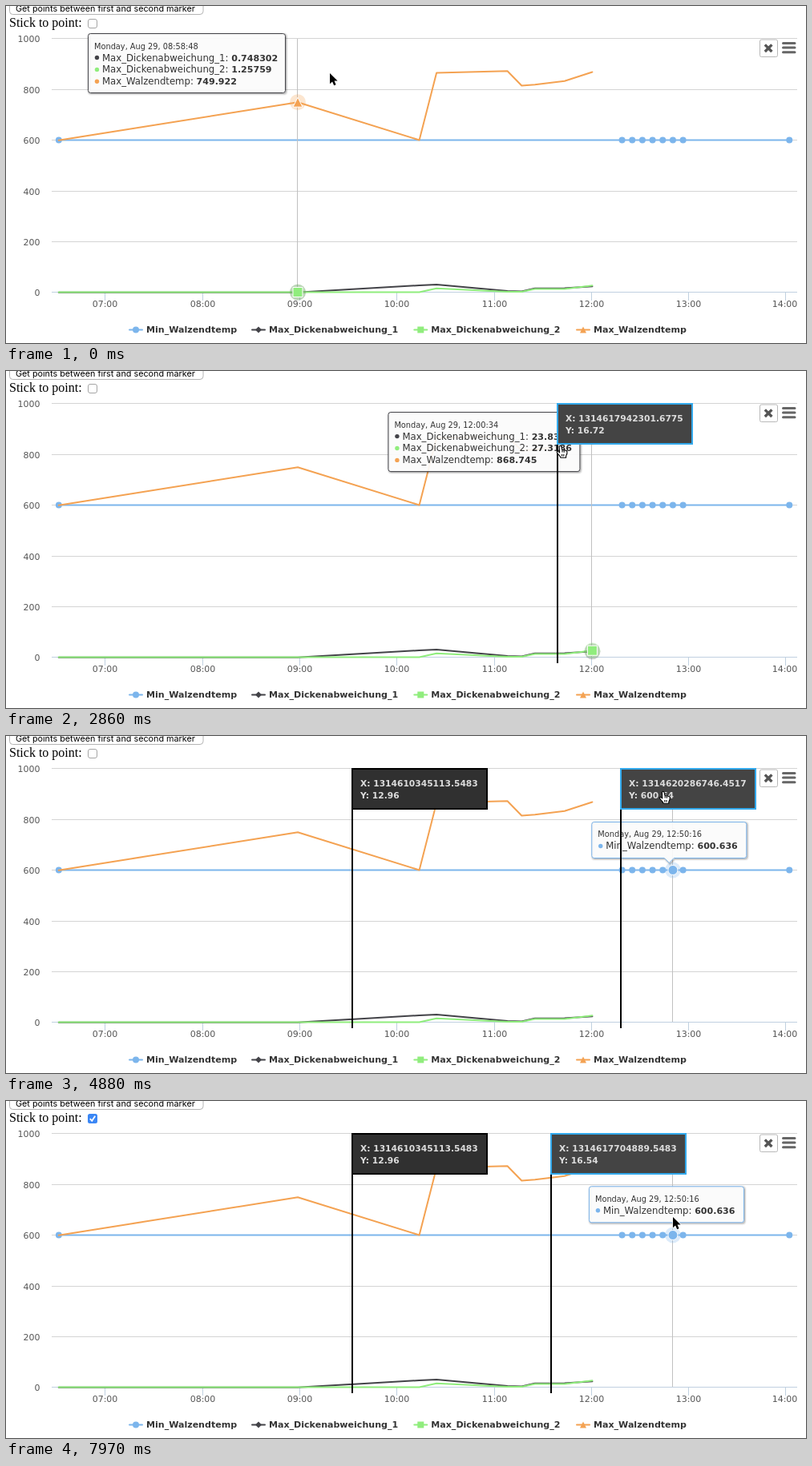
An HTML page for the animation above (8000 ms loop, 998 px wide and 421 px high).

```html
<!DOCTYPE html>
<html lang="en">
<head>
<meta charset="utf-8">
<title>Chart markers</title>
<style>
html, body { margin: 0; width: 100%; height: 100%; overflow: hidden; background: #fff; }
svg { display: block; width: 998px; height: 421px; }
text { font-family: "DejaVu Sans", sans-serif; font-size: 11.7px; fill: #333; white-space: pre; }
.axis { font-size: 11px; fill: #555; }
.head { font-size: 9.8px; }
.bold { font-size: 11.05px; font-weight: bold; }
.tag { font-size: 10.7px; font-weight: bold; fill: #ddd; }
.btn { font: 10.8px Inter, sans-serif; fill: #000; }
.stick { font: 16px "Liberation Serif", serif; fill: #000; }
</style>
</head>
<body>
<svg viewBox="0 0 998 421">
  <g id="base"></g>
  <g id="live"></g>
</svg>
<script>
const LOOP = 8000, STEP = 8;
const HOUR_W = 121.3, MIN = 600.636;
const SERIES = [
  { name: 'Min_Walzendtemp', color: '#7cb5ec', shape: 'circle', legend: 154 },
  { name: 'Max_Dickenabweichung_1', color: '#434348', shape: 'diamond', legend: 307 },
  { name: 'Max_Dickenabweichung_2', color: '#90ed7d', shape: 'square', legend: 509.3 },
  { name: 'Max_Walzendtemp', color: '#f4a252', shape: 'triangle', legend: 712 }
];
const [BLUE, DARK] = SERIES.map(e => e.color);

const xOf = hour => 123.8 + (hour - 7) * HOUR_W;
const yOf = v => 357.9 - v * 0.317;
const clamp = (v, lo, hi) => Math.max(lo, Math.min(hi, v));
const pad = n => String(n).padStart(2, '0');

function clock(hour) {
  const s = Math.round(hour * 3600);
  return [s / 3600, s / 60 % 60, s % 60].map(n => pad(Math.floor(n))).join(':');
}

// [second of the day, thickness 1, thickness 2, temperature]
const ROLLS = [
  [23480, 0.61204, 0.8125, 600.121],
  [32328, 0.748302, 1.25759, 749.922],
  [36827, 27.9792, 1.2571, 600.715],
  [37467, 31.0042, 16.1258, 866.067],
  [40091, 5.57699, 2.3787, 872.496],
  [40619, 4.31072, 2.6114, 815.214],
  [41108, 16.0901, 14.0262, 818.903],
  [42206, 16.9203, 13.6107, 833.117],
  [43234, 23.8312, 27.3186, 868.745]
].map(([s, ...values]) => ({ hour: s / 3600, values }));

// Seven readings about six minutes apart, then a late one
const minHours = Array.from({ length: 7 }, (_, i) => 46216 / 3600 + (i - 5) * 0.1045).concat(14.036);

const points = ROLLS.map((r, i) => ({
  hour: r.hour,
  rows: (i ? [] : [[0, MIN]]).concat(r.values.map((v, k) => [k + 1, v]))
})).concat(minHours.map(hour => ({ hour, rows: [[0, MIN]] })));

for (const p of points) {
  p.x = xOf(p.hour);
  p.single = p.rows.length === 1;
  const longest = Math.max(...p.rows.map(r => String(r[1]).length));
  p.w = p.single ? 193 : 190 + longest * 7;
  p.h = 30.5 + 14.5 * p.rows.length;
  p.left = p.single ? p.x - p.w / 2 : p.x - 15.5 - p.w;
  if (p.left < 57) p.left = p.x + 15.5;
}

// Pointer stops: [time, x, y]
const STOPS = [[40, 404, 84], [210, 419, 88], [970, 419, 88], [1400, 470, 88], [1738, 581, 89],
  [1890, 666, 90], [2300, 735, 93], [2650, 735, 93], [2860, 692, 93], [3480, 442, 114], [3690, 481, 112],
  [4150, 766, 72], [4420, 766, 72], [4650, 834, 69], [4790, 834, 69], [4870, 822, 69], [5300, 735, 69],
  [5450, 735, 69], [5700, 545, 40], [5920, 180, 20], [6130, 86, 23], [7120, 86, 23], [7250, 150, 50],
  [7580, 832, 145]];

// Marker stops: [time, ms after EPOCH]
const EPOCH = 1314610000000, SEVEN = -8800000;
const FIRST = { born: 620, grab: 970, free: 4420,
  stops: [[1000, -15168.7734], [1930, 3550177.2903], [2300, 9185161.2581], [2600, 9185161.2581],
    [2905, 7942301.6775], [3530, 345113.5483]] };
const SECOND = { born: 4150, grab: 4420, free: LOOP,
  stops: [[4930, 10286746.4517], [5300, 7704889.5483]] };

// Walks linearly from stop to stop, resting for a while before each next one
function travel(stops, t, k = 1, rest = 0) {
  const i = stops.findIndex(s => t < s[0]);
  if (i === 0) return stops[0][k];
  if (i < 0) return stops[stops.length - 1][k];
  const a = stops[i - 1], b = stops[i];
  const u = Math.min(1, (t - a[0]) / (b[0] - a[0] - rest));
  return a[k] * (1 - u) + b[k] * u;
}
const pointer = t => ({ x: travel(STOPS, t, 1), y: travel(STOPS, t, 2) });
const markerMs = (m, t) => travel(m.stops, t, 1, 45);
const markerHour = (m, t) => 7 + (markerMs(m, t) - SEVEN) / 3600000;

// The tooltip follows the nearest point, covering a third of the way every 32 ms
const LAG = 120;
const glide = Math.pow(2 / 3, STEP / 32);
const states = [];
(function simulate() {
  let s = { p: points[1], x: points[1].left, y: 34.5, ty: 34.5, idle: 0 };
  for (let t = 0; t <= LOOP; t += STEP) {
    const c = pointer(t - LAG);
    s = { ...s };
    if (c.y < 41) {
      s.idle += STEP;
    } else {
      const p = points.reduce((a, b) => Math.abs(b.x - c.x) < Math.abs(a.x - c.x) ? b : a);
      if (p !== s.p) s.ty = p.single ? 107.5 : Math.max(32, c.y - 41) + 0.5;
      if (s.idle > 700) Object.assign(s, { x: p.left, y: s.ty });
      s.p = p;
      s.idle = 0;
    }
    s.x = s.p.left + (s.x - s.p.left) * glide;
    s.y = s.ty + (s.y - s.ty) * glide;
    states.push(s);
  }
})();

const rect = (x, y, w, h, attrs) => `<rect x="${x}" y="${y}" width="${w}" height="${h}" ${attrs}/>`;
const path = (d, attrs) => `<path d="${d}" ${attrs}/>`;
const text = (x, y, s, attrs = '') => `<text x="${x}" y="${y}" ${attrs}>${s}</text>`;
const lineTo = pts => 'M' + pts.map(p => p[0].toFixed(1) + ' ' + p[1].toFixed(1)).join('L');

function symbol(shape, x, y, r, attrs) {
  if (shape === 'circle') return `<circle cx="${x}" cy="${y}" r="${r}" ${attrs}/>`;
  const d = {
    diamond: `M${x} ${y - r}l${r} ${r}l${-r} ${r}l${-r} ${-r}z`,
    square: `M${x - r} ${y - r}h${2 * r}v${2 * r}h${-2 * r}z`,
    triangle: `M${x} ${y - r}l${r} ${2 * r}h${-2 * r}z`
  };
  return path(d[shape], attrs);
}

function drawBase() {
  let s = rect(4.5, -10.5, 241.5, 21, 'rx="4" fill="#fff" stroke="#b4b4b4"');
  s += text(12, 7, 'Get points between first and second marker', 'class="btn"');
  s += text(4, 26, 'Stick to point:', 'class="stick"');
  for (let v = 0; v <= 1000; v += 200) {
    const y = Math.round(yOf(v) - 0.5) + 0.5;
    s += path(`M57 ${y}H987`, 'stroke="#d4d4d4"');
    s += text(42.5, y + 4.5, v, 'class="axis" text-anchor="end"');
  }
  s += path('M57 357.5H987', 'stroke="#c0d0e0"');
  for (let h = 7; h <= 14; h++) {
    const x = Math.floor(xOf(h)) + 0.5;
    s += path(`M${x} 358v10`, 'stroke="#c0d0e0"');
    s += text(Math.min(x, 971.5), 376, pad(h) + ':00', 'class="axis" text-anchor="middle"');
  }
  const stroke = c => `fill="none" stroke="${c}" stroke-width="2" stroke-linejoin="round" stroke-linecap="round"`;
  SERIES.forEach((e, k) => {
    const line = points.flatMap(p => p.rows.filter(r => r[0] === k).map(r => [p.x, yOf(r[1])]));
    s += path(lineTo(line), stroke(e.color));
    if (k === 0) s += line.map(([x, y]) => symbol('circle', x, y, 4, `fill="${e.color}"`)).join('');
    s += path(`M${e.legend} 404.5h16`, stroke(e.color));
    s += symbol(e.shape, e.legend + 8, 404.5, 4, `fill="${e.color}"`);
    s += text(e.legend + 21, 408, e.name, 'class="bold"');
  });
  s += rect(940.5, 42, 22, 21.5, 'rx="2" fill="#fff" stroke="#b8b8b8"');
  s += path('M946.8 48.4l8.6 8.6m0-8.6l-8.6 8.6', 'stroke="#555" stroke-width="3.4"');
  s += path('M969.5 46.5h14.5m-14.5 5.6h14.5m-14.5 5.6h14.5',
    'stroke="#666" stroke-width="3" stroke-linecap="round"');
  return s;
}

function drawCheckbox(on) {
  if (!on) return rect(102.5, 16.5, 11, 11, 'rx="2.5" fill="#fff" stroke="#a5a5a5"');
  return rect(102, 16, 12, 12, 'rx="2.5" fill="#3b87f5"') +
    path('M104.8 22.2l2.4 2.6l4-6', 'fill="none" stroke="#fff" stroke-width="1.8"');
}

function drawHover(p) {
  let s = path(`M${Math.round(p.x) - 0.5} 41V357`, 'stroke="#c0c0c0"');
  for (const [k, v] of p.rows) {
    const e = SERIES[k], y = yOf(v);
    s += symbol('circle', p.x, y, 10, `fill="${e.color}" opacity=".27"`);
    s += symbol(e.shape, p.x, y, 6, `fill="${e.color}" stroke="#fff"`);
  }
  return s;
}

function drawTip({ p, x, y, idle }) {
  const fade = clamp(1 - (idle - 540) / 230, 0, 1);
  if (!fade) return '';
  const tail = p.single && Math.abs(x - p.left) < 6;
  const { w, h } = p, mid = w / 2;
  const d = `M3 0H${w - 3}q3 0 3 3V${h - 3}q0 3 -3 3` +
    (tail ? `H${mid + 6}L${mid} ${h + 6}L${mid - 6} ${h}` : '') + `H3q-3 0 -3 -3V3q0 -3 3 -3z`;
  let s = '';
  for (const width of [5, 3, 1]) {
    s += path(d, `transform="translate(1 1)" fill="none" stroke="#000" stroke-opacity="${(6 - width) / 30}" stroke-width="${width}"`);
  }
  s += path(d, `fill="#fbfbfb" fill-opacity=".92" stroke="${p.single ? BLUE : DARK}"`);
  s += text(7.5, 19, 'Monday, Aug 29, ' + clock(p.hour), 'class="head"');
  p.rows.forEach(([k, v], i) => {
    const base = 34 + 14.9 * i;
    s += `<circle cx="11" cy="${base - 4}" r="2.7" fill="${SERIES[k].color}"/>`;
    s += text(17.5, base, `${SERIES[k].name}: <tspan class="bold">${v}</tspan>`);
  });
  return `<g transform="translate(${x.toFixed(2)} ${y.toFixed(2)})" opacity="${fade}">${s}</g>`;
}

function thickness(hour) {
  const i = ROLLS.findIndex(r => hour <= r.hour);
  if (i < 1) return MIN;
  const a = ROLLS[i - 1], b = ROLLS[i];
  return a.values[0] + (b.values[0] - a.values[0]) * (hour - a.hour) / (b.hour - a.hour);
}

function drawMarker(m, t, lead) {
  const hour = markerHour(m, t), x = Math.round(xOf(hour));
  const active = t >= m.grab && t < m.free;
  return path(`M${x} 40V365`, 'stroke="#000" stroke-width="2"') +
    rect(x, 41, 168, 50, `fill="${active ? '#444' : '#303030'}" stroke="${active ? '#33a9ec' : '#000'}" stroke-width="2"`) +
    text(x + 10, 63, 'X: ' + (EPOCH + markerMs(m, t)).toFixed(4), 'class="tag"') +
    text(x + 10, 78, 'Y: ' + thickness(hour + lead).toFixed(2), 'class="tag"');
}

const ARROW = path('M0 0V13.2L3.1 10.4L5.2 15.2L7.6 14.2L5.5 9.5H9.6z',
  'fill="#000" stroke="#fff" stroke-width="1.4" paint-order="stroke"');
const HAND = path('M-1.4 1.2q1.4 -2 2.6 0l1 4.4q1.2 -1 2.2 .4q1.4 -.8 2.2 .6q1.6 -.4 1.8 1.2' +
  'q.3 3.2 -1.4 5.2v2.2h-6.6q-1 -2.4 -3.4 -4.6q-2.4 -2.8 -.8 -3.2q1.2 -.2 2.8 1.6z' +
  'M2.4 6v2.6M4.6 6.4v2.4M2 11v2.6M4.2 11v2.6', 'fill="#fff" stroke="#000" stroke-width="1.1" stroke-linejoin="round"');

const live = document.getElementById('live');
document.getElementById('base').innerHTML = drawBase();

function render(t) {
  const state = states[Math.floor(t / STEP)], c = pointer(t);
  const markers = [FIRST, SECOND].filter(m => t >= m.born);
  let s = drawCheckbox(t >= 6400);
  if (!state.idle) s += drawHover(state.p);
  s += drawTip(state);
  let hand = false;
  for (const m of markers) {
    const ahead = c.x - xOf(markerHour(m, t));
    // While dragged, the value is read part of the way towards the pointer
    const dragged = m === FIRST && t > m.grab && t < 3480;
    s += drawMarker(m, t, dragged ? 0.675 * (ahead - 4) / HOUR_W : 0);
    if (ahead > -4 && ahead < 168 && c.y > 41 && c.y < 100) hand = true;
  }
  live.innerHTML = s + `<g transform="translate(${c.x.toFixed(1)} ${c.y.toFixed(1)})">${hand ? HAND : ARROW}</g>`;
}

const start = performance.now();
function frame() {
  render((performance.now() - start) % LOOP);
  requestAnimationFrame(frame);
}
frame();
</script>
</body>
</html>
```
